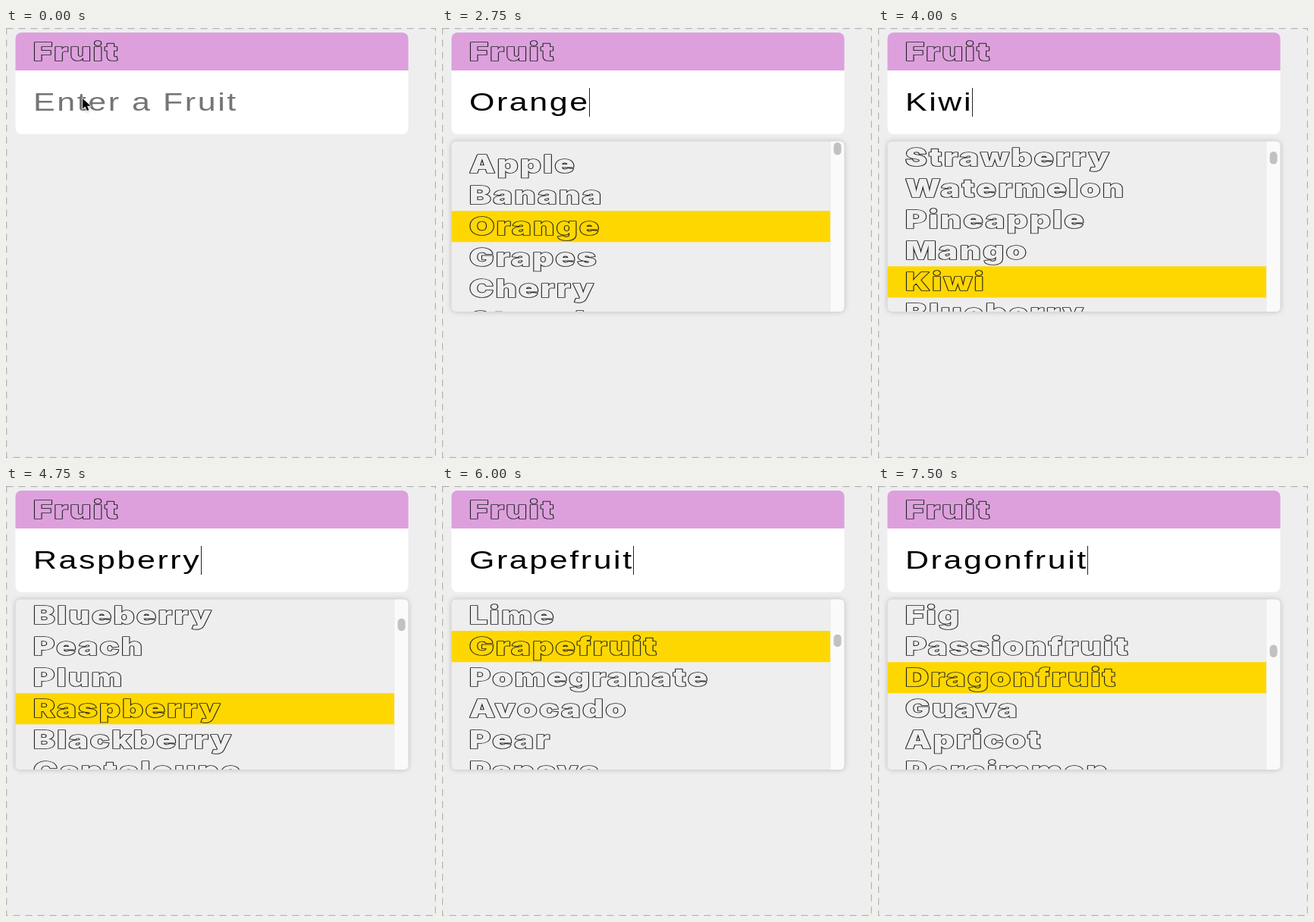
An HTML page with a canvas for the animation above (8 s loop, 567 by 567 pixels).

```html
<!DOCTYPE html>
<html lang="en">
<head>
<meta charset="utf-8">
<title>Fruit autocomplete</title>
<style>
  html, body { margin: 0; width: 100%; height: 100%; overflow: hidden; background: #eee; }
  canvas { display: block; width: 100vw; height: 100vh; }
</style>
</head>
<body>
<canvas id="stage" width="567" height="567"></canvas>
<script>
const ctx = document.getElementById('stage').getContext('2d');
const LOOP = 8000, STEP = 250;
const PLUM = '#dda0dd', GOLD = '#ffd700', PAPER = '#eee';
const STRETCH = 1.3, TEXT_X = 36, ROW = 41.1, FIRST_ROW = 159;
const INPUT_FONT = '33px "Liberation Sans", Arial, sans-serif';
const OUTLINE_FONT = '900 33px Inter, "Noto Sans", sans-serif';
const FRUITS = ('Apple Banana Orange Grapes Cherry Strawberry Watermelon Pineapple Mango Kiwi ' +
  'Blueberry Peach Plum Raspberry Blackberry Cantaloupe Honeydew Coconut Lemon Lime ' +
  'Grapefruit Pomegranate Avocado Pear Papaya Fig Passionfruit Dragonfruit Guava ' +
  'Apricot Persimmon').split(' ');
const PAGE_STARTS = [0, 5, 10, 15, 19, 25];

function box(x, y, w, h, color, radius = 0) {
  ctx.fillStyle = color;
  ctx.beginPath();
  ctx.roundRect(x, y, w, h, radius);
  ctx.fill();
}

// Draws horizontally stretched text and returns its advance on the stage.
function label(text, x, baseline, font, color, outline) {
  ctx.save();
  ctx.translate(x, baseline);
  ctx.scale(STRETCH, 1);
  ctx.font = font;
  ctx.letterSpacing = '2px';
  if (outline) {
    ctx.lineJoin = 'round';
    ctx.lineWidth = 1.7;
    ctx.strokeStyle = outline;
    ctx.strokeText(text, 0, 0);
  }
  ctx.fillStyle = color;
  ctx.fillText(text, 0, 0);
  const width = ctx.measureText(text).width * STRETCH;
  ctx.restore();
  return width;
}

const outlined = (text, baseline, fill) =>
  label(text, TEXT_X, baseline, OUTLINE_FONT, fill, '#222');

function panel(height, blur, shade) {
  ctx.save();
  ctx.shadowColor = shade;
  ctx.shadowBlur = blur;
  box(12.5, 149.5, 518, height, PAPER, 6);
  ctx.restore();
}

function border() {
  ctx.save();
  ctx.strokeStyle = '#b4b4b4';
  ctx.lineWidth = 1.5;
  ctx.setLineDash([9, 7]);
  ctx.strokeRect(0.5, 0.5, 566, 566);
  ctx.restore();
}

function loader(t) {
  panel(93.5, 8, 'rgba(0,0,0,.3)');
  const sizes = t < 1250 ? [1, 0.78, 0.6] : [1, 1, 0.78];
  [246.5, 277, 300.5].forEach((x, i) => {
    ctx.fillStyle = PLUM;
    ctx.beginPath();
    ctx.ellipse(x, 196, 8.3 * sizes[i], 6.2 * sizes[i], 0, 0, Math.PI * 2);
    ctx.fill();
  });
}

function list(active) {
  panel(224.5, 7, 'rgba(0,0,0,.22)');
  const first = PAGE_STARTS.filter(start => start <= Math.max(active, 0)).pop();
  const scroll = first ? (first + 0.22) * ROW : 0;
  ctx.save();
  ctx.beginPath();
  ctx.roundRect(12.5, 149.5, 518, 224.5, 6);
  ctx.clip();
  FRUITS.forEach((fruit, i) => {
    const top = FIRST_ROW + i * ROW - scroll;
    if (top < 140 || top > 374) return;
    if (i === active) box(12, top, 500, ROW, GOLD);
    outlined(fruit, top + 32, i === active ? GOLD : PAPER);
  });
  box(512.5, 149, 18, 226, '#fafafa');
  box(516.5, 151 + scroll * 0.0565, 10, 16.5, '#c1c1c1', 5);
  ctx.restore();
}

function pointer(x, y) {
  ctx.save();
  ctx.translate(x, y);
  ctx.shadowColor = 'rgba(0,0,0,.3)';
  ctx.shadowBlur = 3;
  ctx.shadowOffsetY = 1;
  const arrow = new Path2D('M0 0V13.5L3.4 10.6L5.8 16L8.3 15L6 9.8H10.6Z');
  ctx.strokeStyle = '#fff';
  ctx.lineWidth = 1.4;
  ctx.stroke(arrow);
  ctx.shadowColor = 'transparent';
  ctx.fillStyle = '#000';
  ctx.fill(arrow);
  ctx.restore();
}

function draw(time) {
  const t = Math.min(Math.floor(time % LOOP / STEP) * STEP, 7500);
  const typing = t >= 2500;
  const active = typing ? Math.floor(2.85 + (t - 2750) / 189) : -1;

  box(0, 0, 567, 567, PAPER);
  border();
  box(12.5, 6, 518, 50, PLUM, [8, 8, 0, 0]);
  box(12.5, 56, 518, 84, '#fff', [0, 0, 8, 8]);
  outlined('Fruit', 42.5, PLUM);

  if (t >= 1500) list(active);
  else if (t >= 1000) loader(t);

  const width = typing
    ? label(FRUITS[active], TEXT_X, 109, INPUT_FONT, '#000')
    : (label('Enter a Fruit', TEXT_X, 109, INPUT_FONT, '#757575'), 0);
  const caretOn = typing || t >= 2000 || (t >= 1000 && t < 1500);
  if (caretOn) box(Math.round(TEXT_X + width - 0.6), 79, 1, 38, '#222');

  if (!typing) {
    if (t < 250) pointer(101, 93);
    else if (t < 750) pointer(112, 104);
    else pointer(111.5, 99);
  }
}

function tick() {
  draw(performance.now());
  requestAnimationFrame(tick);
}
tick();
</script>
</body>
</html>
```
